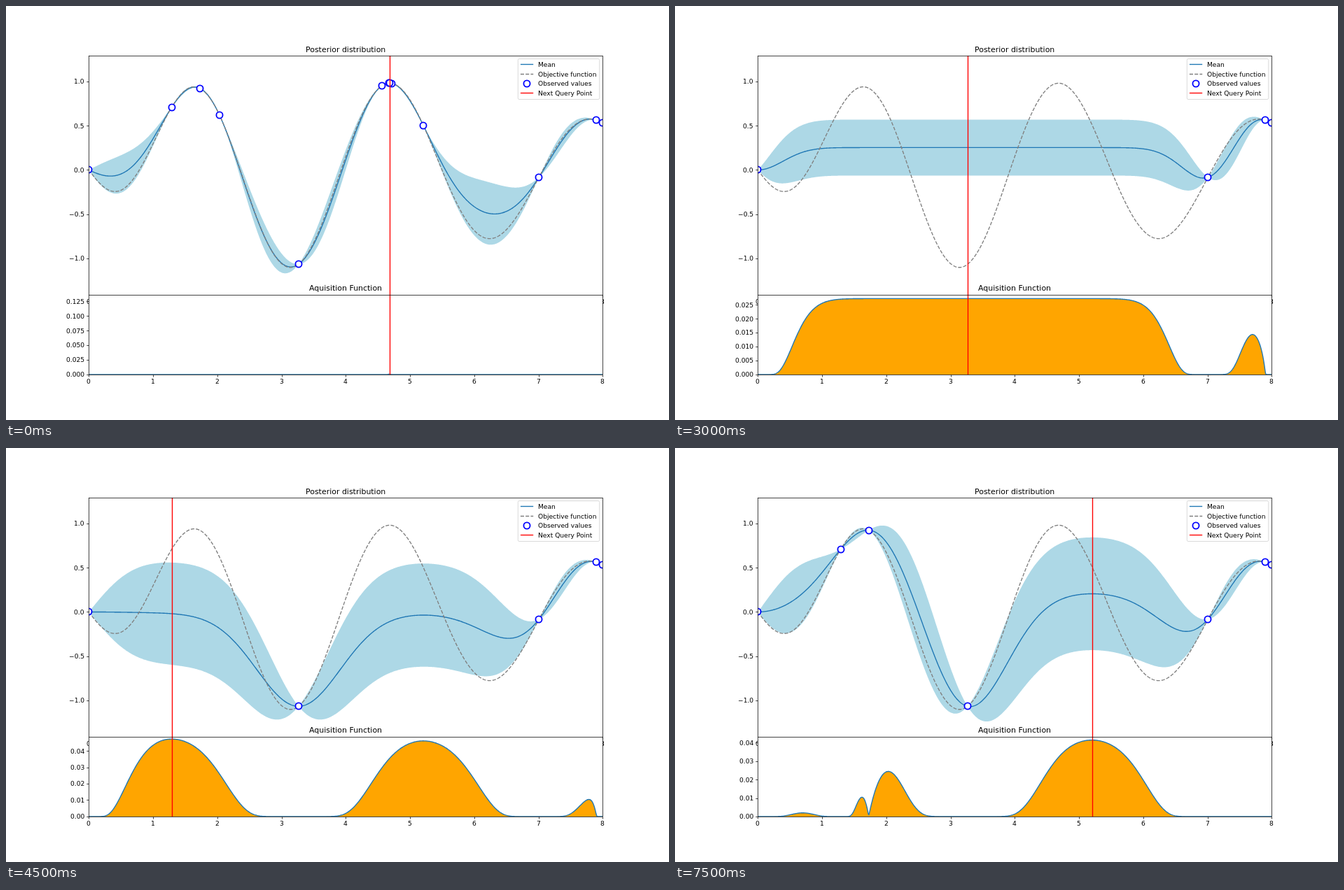
An HTML page with a canvas for the animation above (8000 ms loop, 947 by 592 pixels).

```html
<!DOCTYPE html>
<html lang="en">
<head>
<meta charset="utf-8">
<title>Posterior distribution</title>
<style>
  html, body { margin: 0; width: 100%; height: 100%; overflow: hidden; background: #fff; }
  canvas { display: block; width: 947px; height: 592px; }
</style>
</head>
<body>
<canvas id="stage" width="947" height="592"></canvas>
<script>
const ctx = document.getElementById('stage').getContext('2d');

// Plot geometry, in pixels; PT is one typographic point.
const PT = 0.9134, LEFT = 118.38, RIGHT = 852.3, TOP = 71.04, MIDDLE = 412.92, BOTTOM = 526.88;
const MID_X = (LEFT + RIGHT) / 2, LINE = 1.5 * PT, HAIR = 0.8 * PT, FONT = 10 * PT;
const BLUE = '#1f77b4', GREY = '#808080', RED = '#f00';
const STEP_MS = 1500, LOOP_MS = 8000;

const px = x => LEFT + x * (RIGHT - LEFT) / 8;
const py = y => 234.45 - y * 126.4;
const snap = v => Math.round(v) + 0.5; // centre of a pixel, for straight lines
const objective = x => -x * Math.exp(-x / 3) * Math.cos(2 * x);
const grid = Array.from({ length: 1001 }, (_, i) => i * 0.008);

// Query points in the order in which they are observed.
const queries = [0, 8, 7.904, 7.007, 3.264, 1.289, 1.725, 5.206, 4.568, 2.035, 4.715, 4.675, 4.685, 4.686];
const steps = [
  { count: 13, top: 0.1363, tick: 0.025, digits: 3 },
  { count: 3, top: 0.1363, tick: 0.025, digits: 3 },
  { count: 4, top: 0.02858, tick: 0.005, digits: 3 },
  { count: 5, top: 0.0487, tick: 0.01, digits: 2 },
  { count: 6, top: 0.0892, tick: 0.02, digits: 2 },
  { count: 7, top: 0.0432, tick: 0.01, digits: 2 }
].map(step => ({ ...step, ...model(queries.slice(0, step.count)), next: queries[step.count] }));

// ---- Gaussian process regression and expected improvement ----

function dot(a, b) {
  return a.reduce((sum, value, i) => sum + value * b[i], 0);
}

function kernel(a, b, length) {
  return Math.exp(-((a - b) ** 2) / (2 * length * length));
}

function forwardSolve(L, b) {
  const v = [];
  for (let i = 0; i < b.length; i++) {
    let sum = b[i];
    for (let j = 0; j < i; j++) sum -= L[i][j] * v[j];
    v.push(sum / L[i][i]);
  }
  return v;
}

function cholesky(xs, length) {
  const L = [], noise = 1e-5;
  xs.forEach((x, i) => {
    const row = forwardSolve(L, xs.slice(0, i).map(p => kernel(p, x, length)));
    L.push([...row, Math.sqrt(1 + noise - dot(row, row))]);
  });
  return L;
}

function normalCdf(z) {
  const x = Math.abs(z) / Math.SQRT2, t = 1 / (1 + 0.3275911 * x);
  const poly = t * (0.254829592 + t * (-0.284496736 + t * (1.421413741 + t * (-1.453152027 + t * 1.061405429))));
  const tail = poly * Math.exp(-x * x) / 2;
  return z < 0 ? tail : 1 - tail;
}

function improvement(mean, sigma, best) {
  if (sigma < 1e-5) return 0;
  const z = (mean - best) / sigma;
  const density = Math.exp(-z * z / 2) / Math.sqrt(2 * Math.PI);
  return Math.max(0, (mean - best) * normalCdf(z) + sigma * density);
}

// Length scale and variance (at least 0.1) maximise the marginal likelihood.
function model(xs) {
  const ys = xs.map(objective), n = xs.length;
  const offset = ys.reduce((a, b) => a + b) / n;
  const centred = ys.map(y => y - offset);
  let fit = { cost: Infinity };
  for (let length = 0.2; length < 2; length += 0.002) {
    const L = cholesky(xs, length), w = forwardSolve(L, centred), q = dot(w, w);
    const variance = Math.max(0.1, q / n);
    const logDet = 2 * L.reduce((sum, row, i) => sum + Math.log(row[i]), 0);
    const cost = q / variance + n * Math.log(variance) + logDet;
    if (cost < fit.cost) fit = { cost, length, L, w, variance };
  }
  const best = Math.max(...ys), mean = [], sigma = [];
  for (const x of grid) {
    const v = forwardSolve(fit.L, xs.map(p => kernel(p, x, fit.length)));
    mean.push(offset + dot(v, fit.w));
    sigma.push(Math.sqrt(Math.max(0, fit.variance * (1 - dot(v, v)))));
  }
  return { xs, mean, sigma, gain: mean.map((m, i) => improvement(m, sigma[i], best)) };
}

// ---- Drawing ----

// The anchor is the part of the text width that lies left of x.
function text(label, x, y, anchor, size = FONT) {
  ctx.font = `${size}px "DejaVu Sans", sans-serif`;
  ctx.fillStyle = '#000';
  ctx.fillText(label, Math.round(x - anchor * ctx.measureText(label).width), Math.round(y));
}

function stroke(points, color, width = LINE, dash = []) {
  ctx.beginPath();
  points.forEach(([x, y]) => ctx.lineTo(x, y));
  ctx.strokeStyle = color;
  ctx.lineWidth = width;
  ctx.setLineDash(dash);
  ctx.stroke();
  ctx.setLineDash([]);
}

function fill(points, color) {
  ctx.beginPath();
  points.forEach(([x, y]) => ctx.lineTo(x, y));
  ctx.fillStyle = color;
  ctx.fill();
}

const curve = (values, toY) => values.map((v, i) => [px(grid[i]), toY(v)]);
const dashes = [3.7 * LINE, 1.6 * LINE];

function marker(x, y) {
  ctx.beginPath();
  ctx.arc(Math.round(x), Math.round(y), 5 * PT, 0, 2 * Math.PI);
  ctx.fillStyle = '#fff';
  ctx.fill();
  ctx.strokeStyle = '#00f';
  ctx.lineWidth = 2 * PT;
  ctx.stroke();
}

// White panel with its contents clipped to it.
function panel(top, bottom, draw) {
  const x = Math.round(LEFT), y = Math.round(top);
  ctx.save();
  ctx.beginPath();
  ctx.rect(x, y, Math.round(RIGHT) - x, Math.round(bottom) - y);
  ctx.fillStyle = '#fff';
  ctx.fill();
  ctx.clip();
  draw();
  ctx.restore();
}

function queryLine(x, top, bottom) {
  stroke([[snap(px(x)), top], [snap(px(x)), bottom + 1]], RED);
}

function decorate(title, top, bottom) {
  for (let x = 0; x <= 8; x++) {
    const tickX = snap(px(x)), y = snap(bottom);
    stroke([[tickX, y], [tickX, y + 3.5 * PT]], '#000', HAIR);
    text(x, px(x), bottom + 13.3, 0.5);
  }
  ctx.strokeStyle = '#000';
  ctx.lineWidth = HAIR;
  ctx.strokeRect(snap(LEFT), snap(top), snap(RIGHT) - snap(LEFT), snap(bottom) - snap(top));
  text(title, MID_X, top - 6 * PT, 0.5, 12 * PT);
}

function yTick(label, y) {
  stroke([[snap(LEFT) - 3.5 * PT, snap(y)], [snap(LEFT), snap(y)]], '#000', HAIR);
  text(label, LEFT - 7 * PT, y + 3.4, 1);
}

function legend() {
  ctx.beginPath();
  ctx.roundRect(731.3, 75.6, 116.4, 57.9, 1.83);
  ctx.fillStyle = 'rgba(255, 255, 255, 0.8)';
  ctx.fill();
  ctx.strokeStyle = 'rgba(204, 204, 204, 0.8)';
  ctx.lineWidth = PT;
  ctx.stroke();
  const rowY = i => Math.floor(83.6 + i * 13.6) + 0.5;
  const handle = (i, color, dash) => stroke([[734.9, rowY(i)], [753.2, rowY(i)]], color, LINE, dash);
  handle(0, BLUE);
  handle(1, GREY, dashes);
  marker(744, rowY(2));
  handle(3, RED);
  ['Mean', 'Objective function', 'Observed values', 'Next Query Point']
    .forEach((label, i) => text(label, 760.4, 87 + i * 13.6, 0));
}

function drawPosterior({ xs, mean, sigma, next }) {
  panel(TOP, MIDDLE, () => {
    const upper = curve(mean.map((m, i) => m + sigma[i]), py);
    const lower = curve(mean.map((m, i) => m - sigma[i]), py);
    fill([...upper, ...lower.reverse()], '#add8e6');
    stroke(curve(mean, py), BLUE);
    stroke(curve(grid.map(objective), py), GREY, LINE, dashes);
    xs.forEach(x => marker(px(x), py(objective(x))));
    queryLine(next, TOP, MIDDLE);
  });
  for (let y = -1; y <= 1; y += 0.5) yTick(y.toFixed(1).replace('-', '\u2212'), py(y));
  decorate('Posterior distribution', TOP, MIDDLE);
  legend();
}

function drawAcquisition({ gain, next, top, tick, digits }) {
  const toY = v => BOTTOM - v / top * (BOTTOM - MIDDLE);
  panel(MIDDLE, BOTTOM, () => {
    const points = curve(gain, toY);
    fill([[LEFT, BOTTOM], ...points, [RIGHT, BOTTOM]], '#ffa500');
    stroke(points, BLUE);
    queryLine(next, MIDDLE, BOTTOM);
  });
  for (let i = 0; i * tick < top; i++) yTick((i * tick).toFixed(digits), toY(i * tick));
  decorate('Aquisition Function', MIDDLE, BOTTOM);
}

let shown = -1;
const start = performance.now();

function render() {
  const index = Math.floor((performance.now() - start) % LOOP_MS / STEP_MS);
  if (index !== shown) {
    shown = index;
    ctx.fillStyle = '#fff';
    ctx.fillRect(0, 0, 947, 592);
    drawPosterior(steps[index]);
    drawAcquisition(steps[index]);
  }
  requestAnimationFrame(render);
}
render();
</script>
</body>
</html>
```
